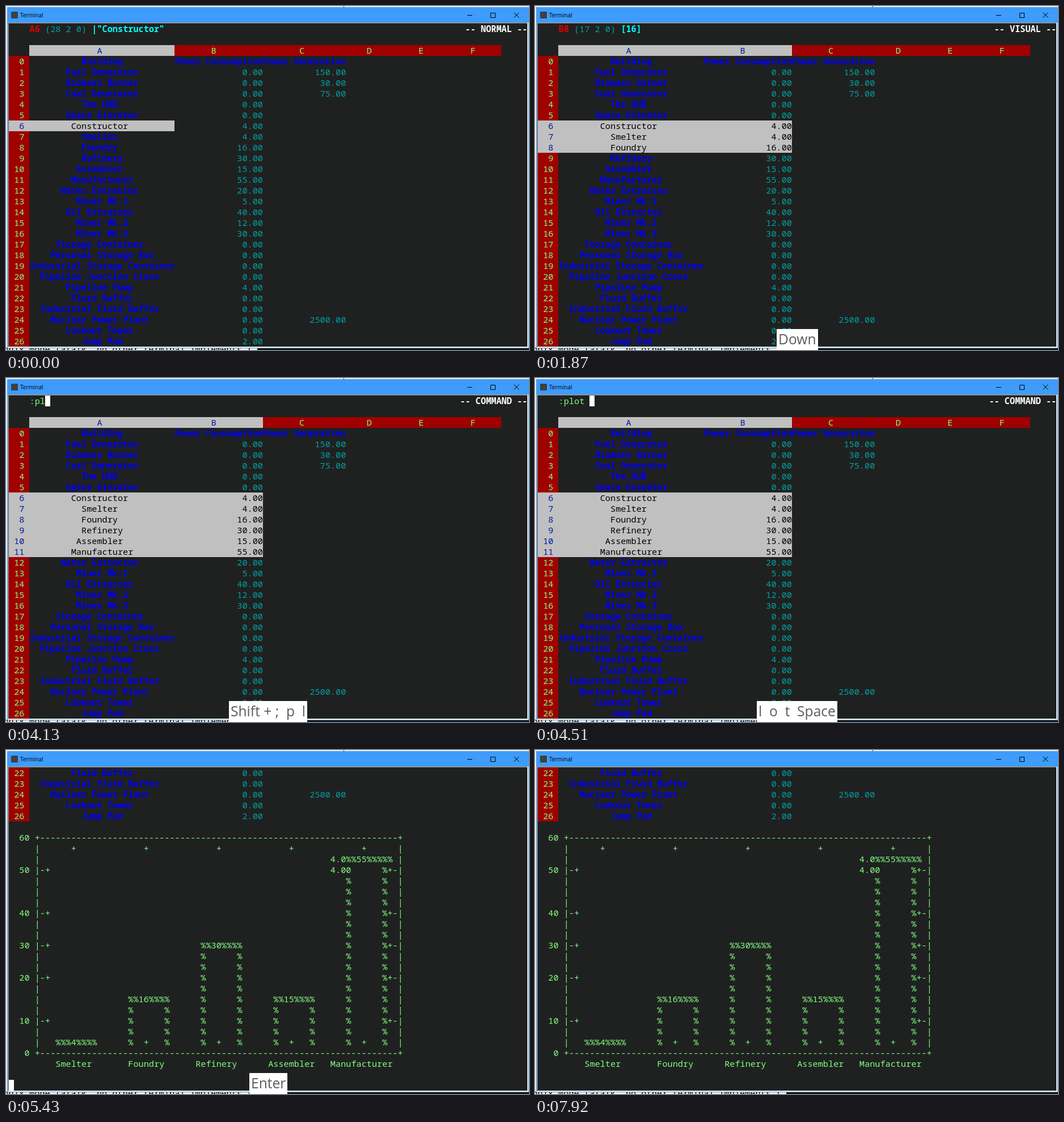
These frames come from a looping animation (922x607 px, 8000 ms). An HTML page with a canvas:

```html
<!DOCTYPE html>
<html lang="en">
<head>
<meta charset="utf-8">
<title>Terminal spreadsheet</title>
<style>
  html, body { margin: 0; width: 100%; height: 100%; overflow: hidden; background: #1f2120; }
  canvas { display: block; }
</style>
</head>
<body>
<canvas id="stage" width="922" height="607"></canvas>
<script>
const ctx = document.getElementById("stage").getContext("2d");
const LOOP = 8000, LEFT = 5, TOP = 31, CELL = 64 / 7, LINE = 19;
const MONO = '15.24px "Noto Sans Mono", "DejaVu Sans Mono", monospace';
const SANS = '"Open Sans", "Noto Sans", sans-serif';
const C = {
  bg: "#1f2120", frame: "#3d9cfc", red: "#a00000", silver: "#c0c0c0", navy: "#001a9c",
  blue: "#0000f0", teal: "#00a0a0", green: "#80ff80", cyan: "#00ffff", cell: "#e00000", white: "#ffffff", black: "#000000"
};

const buildings = [
  ["Fuel Generator", 0, 150], ["Biomass Burner", 0, 30], ["Coal Generator", 0, 75],
  ["The HUB", 0], ["Space Elevator", 0], ["Constructor", 4], ["Smelter", 4], ["Foundry", 16],
  ["Refinery", 30], ["Assembler", 15], ["Manufacturer", 55], ["Water Extractor", 20],
  ["Miner Mk.1", 5], ["Oil Extractor", 40], ["Miner Mk.2", 12], ["Miner Mk.3", 30],
  ["Storage Container", 0], ["Personal Storage Box", 0], ["Industrial Storage Container", 0],
  ["Pipeline Junction Cross", 0], ["Pipeline Pump", 4], ["Fluid Buffer", 0],
  ["Industrial Fluid Buffer", 0], ["Nuclear Power Plant", 0, 2500], ["Lookout Tower", 0], ["Jump Pad", 2]
];
const rows = [["Building", "Power Consumption", "Power Generation"],
  ...buildings.map(([name, ...power]) => [name, ...power.map(p => p.toFixed(2))])];
const columns = [["A", 4, 28], ["B", 32, 17], ["C", 49, 16], ["D", 65, 10], ["E", 75, 10], ["F", 85, 10]];

// Each list holds [start time, value].
const keys = [
  [0, ""], [710, "v"], [1170, "v  Right"], [1320, "Right"], [1640, "Right  Down"], [1790, "Down"],
  [3410, ""], [3670, "Shift + ;"], [4040, "Shift + ;  p"], [4130, "Shift + ;  p  l"], [4270, "p  l  o"],
  [4360, "p  l  o  t"], [4510, "l  o  t  Space"], [4660, "l  o  t  Space  b"], [4740, "o  t  Space  b"],
  [4820, "o  t  Space  b  a"], [4890, "t  Space  b  a  r"], [4970, "Space  b  a  r"],
  [5120, "a  r  Enter"], [5290, "r  Enter"], [5430, "Enter"], [5750, ""]
];
const modes = [[0, "NORMAL"], [710, "VISUAL"], [3670, "COMMAND"], [5120, "PLOT"]];
const lastRow = [[0, 6], [1640, 7], [1870, 8], [2020, 9], [2250, 10], [2800, 11]];
const typed = [[3670, 1], [4040, 2], [4130, 3], [4270, 4], [4360, 5], [4510, 6], [4660, 7], [4820, 8], [4890, 9]];
const blink = [[5120, false], [5290, true], [5750, false], [6290, true], [6840, false], [7370, true], [7920, false]];

const at = (steps, t) => steps.filter(([start]) => start <= t).pop()[1];

function box(x, y, w, h, color) {
  ctx.fillStyle = color;
  ctx.fillRect(x, y, w, h);
}

function fillCells(col, line, width, color) {
  const x = Math.floor(LEFT + col * CELL), end = Math.floor(LEFT + (col + width) * CELL);
  box(x, TOP + line * LINE, end - x, LINE, color);
}

function put(col, line, text, color, bold) {
  ctx.font = (bold ? "bold " : "") + MONO;
  ctx.fillStyle = color;
  ctx.fillText(text, LEFT + col * CELL, TOP + line * LINE + 15);
}

function drawWindow() {
  box(0, 0, 922, 607, "#f0f0f0");
  box(595, 0, 1, 2, "#333");
  box(443, 604, 479, 3, "#151719");
  ctx.font = MONO;
  ctx.fillStyle = C.black;
  ctx.fillText("onix mode (afaik, no other terminal implements t", -4.6, 611);

  // Title bar and border, then the sunken edge around the text area.
  box(2, 2, 920, 602, C.frame);
  box(3, 29, 918, 574, C.white);
  box(3, 29, 917, 573, "#a0a0a0");
  box(4, 30, 916, 572, "#e3e3e3");
  box(4, 30, 915, 571, "#696969");
  box(5, 31, 914, 570, C.bg);

  box(9, 10, 12, 12, "#404040");
  ctx.font = "10px " + SANS;
  ctx.fillStyle = C.black;
  ctx.fillText("Terminal", 25, 20);
  ctx.strokeStyle = C.black;
  ctx.lineWidth = 1;
  ctx.beginPath();
  ctx.moveTo(813, 16.5); ctx.lineTo(822, 16.5);
  ctx.rect(854.5, 12.5, 8, 8);
  ctx.moveTo(895.5, 11.5); ctx.lineTo(904.5, 20.5);
  ctx.moveTo(904.5, 11.5); ctx.lineTo(895.5, 20.5);
  ctx.stroke();
}

function drawRow(index, line, selectedColumns) {
  const label = String(index).padStart(3);
  fillCells(0, line, 4, selectedColumns ? C.silver : C.red);
  put(0, line, label, selectedColumns ? C.navy : C.green);
  rows[index].forEach((text, c) => {
    const [, start, width] = columns[c], selected = c < selectedColumns;
    const gap = width - text.length;
    const offset = c ? gap : Math.floor(gap / 2);
    const heading = c === 0 || index === 0;
    if (selected) fillCells(start, line, width, C.silver);
    put(start + offset, line, text, selected ? C.black : heading ? C.blue : C.teal, heading && !selected);
  });
}

function drawStatus(t, mode, row, col) {
  const status = `-- ${mode} --`;
  put(100 - status.length, 0, status, C.white, true);
  if (mode === "COMMAND") {
    const length = at(typed, t);
    put(4, 0, ":plot bar".slice(0, length), C.green);
    if (length > 1) fillCells(4 + length, 0, 1, C.white);
    return;
  }
  const name = "AB"[col] + row, format = col ? "(17 2 0)" : "(28 2 0)";
  const content = col ? `[${parseFloat(rows[row][1])}]` : `|"${rows[row][0]}"`;
  put(4, 0, name, C.cell, true);
  put(5 + name.length, 0, format, C.teal);
  put(14 + name.length, 0, content, C.cyan, true);
}

function drawSheet(t, mode) {
  const row = at(lastRow, t), col = t < 1170 ? 0 : 1;
  drawStatus(t, mode, row, col);
  columns.forEach(([name, start, width], c) => {
    fillCells(start, 2, width, c <= col ? C.silver : C.red);
    put(start + Math.floor(width / 2) - 1, 2, name, c <= col ? C.navy : C.green);
  });
  rows.forEach((_, i) => drawRow(i, i + 3, i >= 6 && i <= row ? col + 1 : 0));
}

function drawPlot(t) {
  const ink = (col, line, text) => put(col, line, text, C.green);
  for (let i = 22; i <= 26; i++) drawRow(i, i - 22, 0);

  const border = "+" + "-".repeat(69) + "+";
  ink(5, 6, border);
  ink(5, 26, border);
  for (let line = 7; line < 26; line++) {
    ink(5, line, "|");
    ink(75, line, "|");
  }
  [26, 23, 19, 16, 13, 9, 6].forEach((line, i) => {
    ink(2, line, String(i * 10).padStart(2));
    if (i % 6) {
      ink(6, line, "-+");
      ink(73, line, "+-");
    }
  });

  const bars = [[9, 25, "%%%4%%%%"], [23, 21, "%%16%%%%"], [37, 16, "%%30%%%%"],
    [51, 21, "%%15%%%%"], [65, 8, "%%55%%%%%"]];
  bars.forEach(([col, top, cap], i) => {
    const name = rows[i + 7][0];
    ink(col, top, cap);
    for (let line = top + 1; line < 26; line++) {
      if (line !== 9) ink(col, line, "%");
      ink(col + 7, line, "%");
    }
    ink(col + 3, 7, "+");
    if (i) ink(col + 3, 25, "+");
    ink(col + 3 - Math.floor(name.length / 2), 27, name);
  });
  ink(62, 8, "4.0");
  ink(62, 9, "4.00");
  if (at(blink, t)) fillCells(0, 29, 1, C.white);
}

function drawKeys(text) {
  if (!text) return;
  ctx.font = "24.6px " + SANS;
  const width = Math.round(ctx.measureText(text).width) + 6;
  const x = Math.round(462 - width / 2);
  box(x, 570, width, 37, C.white);
  ctx.fillStyle = "#5c5c5c";
  ctx.fillText(text, x + 3, 597);
}

function draw(t) {
  const mode = at(modes, t);
  drawWindow();
  if (mode === "PLOT") drawPlot(t);
  else drawSheet(t, mode);
  drawKeys(at(keys, t));
}

const began = performance.now();
function tick() {
  draw((performance.now() - began) % LOOP);
  requestAnimationFrame(tick);
}
tick();
</script>
</body>
</html>
```
